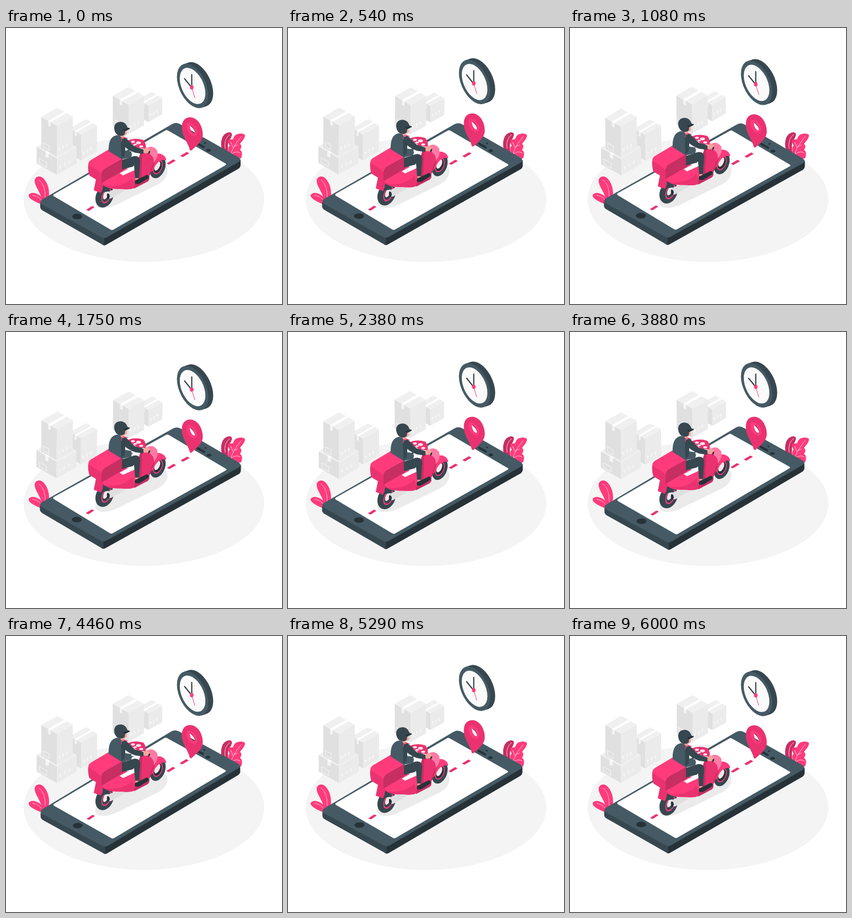
Animation of 500 by 500 pixels, one loop 6.04 s. Source, as an HTML page:

```html
<!DOCTYPE html>
<html lang="en">
<head>
<meta charset="utf-8">
<style>
html, body { margin: 0; width: 100%; height: 100%; overflow: hidden; background: #fff; }
svg { display: block; width: 100vw; height: 100vh; }
.slate { fill: #455a64; } .steel { fill: #37474f; } .ink { fill: #263238; }
.pink { fill: #ff3b7c; } .rose { fill: #eb3270; } .wine { fill: #c72e62; } .blush { fill: #ff7ba6; }
.white { fill: #fff; } .skin { fill: #f7a49c; }
.line { fill: none; stroke-linecap: round; stroke-linejoin: round; }
</style>
</head>
<body>
<svg viewBox="0 0 500 500">
  <defs>
    <linearGradient id="rim" gradientUnits="userSpaceOnUse" x1="364" y1="88" x2="368" y2="96">
      <stop offset=".5" stop-color="#37474f"/><stop offset=".5" stop-color="#263238"/>
    </linearGradient>
  </defs>

  <ellipse cx="250" cy="310.5" rx="218" ry="113.5" fill="#f4f4f4"/>
  <g id="boxes"></g>

  <g id="plants">
    <path class="pink" d="M66 318C66 300 51 287 52 276C53 268 64 266 70 275C78 285 80 300 76 314Z"/>
    <path class="pink" d="M66 320C55 316 42 310 41 304C41 299 50 297 57 301C64 304 68 310 68 318Z"/>
    <path class="line" stroke="#ffb3cb" d="M60 275Q72 285 71 307M48 303Q58 304 64 312"/>
    <path class="wine" d="M399 232C389 224 387 207 393 196C398 189 406 187 409 191C411 198 402 203 402 213Q402 222 404 232Z"/>
    <path class="pink" d="M403 228C404 222 401 218 405 213C401 205 402 201 408 202C413 203 411 197 417 193C424 190 433 191 433 195C432 202 427 205 424 210C428 213 426 218 424 221C429 224 428 230 426 236L416 238Z"/>
    <path class="line" stroke="#ffc4d7" d="M405 193Q394 202 397 218M426 197Q411 214 407 230M407 207L411 216M412 215L419 212M409 228Q416 222 424 226"/>
  </g>

  <g id="phone">
    <path class="steel" d="M62 317L62 325Q63 329 67 331L174 392Q176 394 178 394L182 378Z"/>
    <path class="ink" d="M178 380V394L181 393L421 255Q425 252 425 248V238Z"/>
    <path class="slate" d="M65 311L301 174Q308 170 315 174L421 234Q428 239 421 243L183 379Q178 382 173 379L66 320Q59 316 65 311Z"/>
    <path class="white" d="M87 301L288 186Q291 184 294 186L397 245Q401 247 397 249L195 365Q192 367 189 365L87 305Q84 303 87 301Z"/>
    <ellipse class="ink" cx="129" cy="341.5" rx="9" ry="5"/>
    <path class="line" stroke="#263238" stroke-width="4" d="M346 209L358 215.5"/>
    <ellipse class="ink" cx="360.5" cy="208.5" rx="2" ry="1.4"/>
    <ellipse class="ink" cx="367" cy="221.5" rx="4.2" ry="2.5"/>
    <path class="rose" d="M145 329.500L156 322.500L160.500 324.500L150 331.500ZM291 245.500L303 238L307.500 240.500L295.500 247.500ZM315.500 231.500L327.500 224.500L332 227L320 234Z"/>
  </g>

  <path fill="#ebebeb" d="M162 314C159 327 177 329 196 322L276 283C291 274 296 260 290 251L270 246L166 302Z"/>

  <g id="pin">
    <path class="rose" fill-rule="evenodd" d="M333 221C330 207 318 196 318.500 179C319 166 327 161 336 162C349 164 357 180 356.500 194C356 206 344 214 337 221Q335 223 333 221ZM333 177C336 174 343 182 342.500 190C341 194 333 187 333 177Z"/>
    <path class="pink" fill-rule="evenodd" d="M327 177C327 165 347 175 346.500 190C346 201 328 196 327 177ZM333 177C333 188 341 194 342.500 190C343 182 336 174 333 177Z"/>
    <path class="wine" d="M333 177C336 174 343 182 342.500 190C341 183 336 179 333 177Z"/>
  </g>

  <g id="clock">
    <g id="rimSide" fill="url(#rim)"></g>
    <circle class="slate" r="33" transform="matrix(.86 .5 0 1.11 338 105)"/>
    <circle fill="#fafafa" r="27" transform="matrix(.86 .5 0 1.11 338 105)"/>
    <path class="line" stroke="#263238" stroke-width="2" d="M336.500 107.500V84.500M336 107.500L323.500 92"/>
    <path class="line" stroke="#ff3b7c" d="M336.500 108L342 126"/>
    <ellipse class="pink" cx="336.500" cy="107.500" rx="3.200" ry="4"/>
  </g>

  <g id="scooter">
    <!-- front wheel -->
    <ellipse class="steel" cx="275" cy="252.500" rx="13" ry="20.500" transform="rotate(22 275 252.500)"/>
    <ellipse class="pink" cx="275" cy="252" rx="8" ry="13.500" transform="rotate(22 275 252)"/>
    <ellipse class="ink" cx="275" cy="252" rx="6.500" ry="11.500" transform="rotate(22 275 252)"/>
    <ellipse fill="#f3e9ec" cx="274" cy="250" rx="4.500" ry="9" transform="rotate(24 274 250)"/>
    <path class="pink" d="M264 243C266 232 272 226 280 228C287 230 291 236 290 240C282 236 272 243 267 257L260 264Z"/>

    <!-- rear wheel and exhaust -->
    <ellipse class="steel" cx="178.500" cy="305" rx="15.500" ry="21" transform="rotate(24 178.500 305)"/>
    <ellipse class="pink" cx="182" cy="304" rx="8" ry="14.500" transform="rotate(24 182 304)"/>
    <ellipse class="steel" cx="182" cy="304" rx="6.300" ry="12" transform="rotate(24 182 304)"/>
    <ellipse fill="#f3e9ec" cx="181" cy="302" rx="4" ry="9" transform="rotate(24 181 302)"/>
    <path fill="#dfdfdf" d="M184 303L187 296L212 286L219 289L213 296L190 309Q185 309 184 303Z"/>
    <path class="ink" d="M183 300Q188 299 188 306L186 310Q182 310 183 300Z"/>
    <path class="rose" d="M163 274L159 294L172 299L180 283L176 274Z"/>
    <path class="steel" d="M176 285L190 288L186 296L174 298Z"/>

    <!-- body -->
    <path class="pink" d="M172 276L210 253L240 258L261 262L259 275L231 290Q226 293 214 292C202 291 190 294 178 286Z"/>
    <path class="rose" d="M176 285C194 290 219 284 229 271L234 289Q226 293 214 292C202 290 190 294 176 285Z"/>
    <path class="wine" d="M233 282L258 268Q262 273 257 278L232 291Z"/>
    <path class="white" d="M206 263L232 249L234 257L212 267Z"/>
    <path class="wine" d="M236 250L245 221L270 220Q277 230 271 241L261 266L245 274L237 273Z"/>
    <path class="rose" d="M247 224L264 219Q276 224 273 236L264 251L259 266L245 272Z"/>
    <path class="blush" d="M256 217Q266 211 274 222Q277 233 268 244Q269 232 258 227Z"/>

    <!-- windscreen with light spots -->
    <path class="rose" d="M220 204Q233 198 249 203Q255 211 253 219L238 217Z"/>
    <g fill="#ffe3ec">
      <ellipse cx="230" cy="206" rx="3.500" ry="2"/><ellipse cx="240" cy="208" rx="4.500" ry="2.600"/>
      <ellipse cx="245" cy="214.500" rx="3.600" ry="2"/><ellipse cx="234" cy="211" rx="3" ry="1.600"/>
    </g>

    <!-- delivery box -->
    <path class="rose" d="M149 247L173 257L175 281Q158 272 151 267Q148 258 149 247Z"/>
    <path class="wine" d="M173 262Q174 257 179 254L211 236V259L173 281Z"/>
    <path class="pink" d="M149 248Q149 242 154 239L186 220L211 236L178 255Q174 258 173 264Q160 253 149 248Z"/>

    <!-- rider -->
    <path class="ink" d="M213 240L232 234L238 240L230 251L211 256Z"/>
    <path class="steel" d="M210 239L232 232Q243 231 243 241L241 272L234 274L232 249L210 257Z"/>
    <path class="skin" d="M234 272H240V277H235Z"/>
    <path class="ink" d="M234 276L241 273L255 266Q260 267 258 272L242 282Q234 284 233 280Z"/>
    <path class="slate" d="M186 223C186 208 188 197 201 194L213 197L216 222L229 224L227 234L210 238Z"/>
    <path class="white" d="M228 221H239V228L227 227Z"/>
    <path class="steel" d="M208 203Q212 193 220 202L233 215L249 220Q252 224 248 228L234 226Q223 222 216 216L215 231L209 236Z"/>
    <path class="skin" d="M249 220L255 216L261 221Q259 227 253 227L249 226Z"/>
    <path class="ink" d="M258 224L261 222Q262 226 258 229Z"/>
    <path class="skin" d="M208 188L218 184L219 192Q215 196 213 195L216 198L211 201L207 196Z"/>
    <path class="line" stroke="#ff3b7c" stroke-width="1.300" d="M209 205Q208 195 220 200"/>
    <path class="steel" d="M196 181C196 173 202 169.500 209 170Q217 171 220 180L224 182L216 186L215 193Q208 198 201 193Q196 188 196 181Z"/>
    <path class="ink" d="M212 184L224 181V183L216 187Z"/>
  </g>
</svg>
<script>
const byId = id => document.getElementById(id);
const SLOPE = .565;

// One isometric carton; (x, y) is the top vertex nearest the viewer.
function carton(x, y, w, d, h) {
  const left = (u, v) => [x - u * w, y - u * w * SLOPE + v];
  const right = (u, v) => [x + u * d, y - u * d * SLOPE + v];
  const top = (u, v) => [x - u * w + v * d, y - (u * w + v * d) * SLOPE];
  const face = (color, ...pts) => `<polygon fill="${color}" points="${pts.join(' ')}"/>`;
  const arrow = u => {
    const [ax, ay] = right(u, h - 7);
    return `M${ax} ${ay}v-6l-1.500 2.500m1.500-2.500l1.500 1`;
  };
  return face('#e0e0e0', left(0, 0), left(1, 0), left(1, h), left(0, h)) +
    face('#ebebeb', right(0, 0), right(1, 0), right(1, h), right(0, h)) +
    face('#f0f0f0', top(0, 0), top(1, 0), top(1, 1), top(0, 1)) +
    face('#fff', top(.4, 0), top(.56, 0), top(.56, 1), top(.4, 1)) +
    face('#f5f5f5', left(.4, 0), left(.56, 0), left(.56, 9), left(.4, 8)) +
    `<polygon fill="none" stroke="#f5f5f5" points="${[left(.5, h - 12), left(.86, h - 12), left(.86, h - 3), left(.5, h - 3)].join(' ')}"/>` +
    `<path class="line" stroke="#f8f8f8" d="${[.17, .4, .63].map(arrow).join('')}"/>`;
}

byId('boxes').innerHTML = [
  [258, 140.5, 19, 25, 30], [222, 139, 28.5, 28, 53], [136, 193, 20, 29, 47],
  [92, 236, 36.5, 36, 30], [92, 177, 28, 29, 56]
].map(b => carton(...b)).join('');

byId('rimSide').innerHTML = [9, 7, 5, 3, 1].map(s =>
  `<circle r="33" transform="matrix(.86 .5 0 1.11 ${338 + s} ${105 - s / 3})"/>`).join('');

const move = (id, value) => byId(id).setAttribute('transform', value);
// Linear triangle waves: rise and return, and sway to both sides.
const bob = p => 1 - Math.abs(1 - 2 * p);
const sway = p => p < .25 ? 4 * p : p < .75 ? 2 - 4 * p : 4 * p - 4;
const phase = (t, period) => t % period / period;

function draw(now) {
  const t = now % 6040;
  const lift = `translate(0 ${-10 * bob(phase(t, 1500))})`;
  move('clock', lift);
  move('pin', lift);
  move('scooter', `translate(0 ${-10 * bob(phase(t, 3000))})`);
  move('boxes', `rotate(${sway(phase(t, 1500))} 169 187)`);
  move('phone', `rotate(${sway(phase(t, 6000))} 243.5 283)`);
  requestAnimationFrame(draw);
}
draw(performance.now());
</script>
</body>
</html>
```
